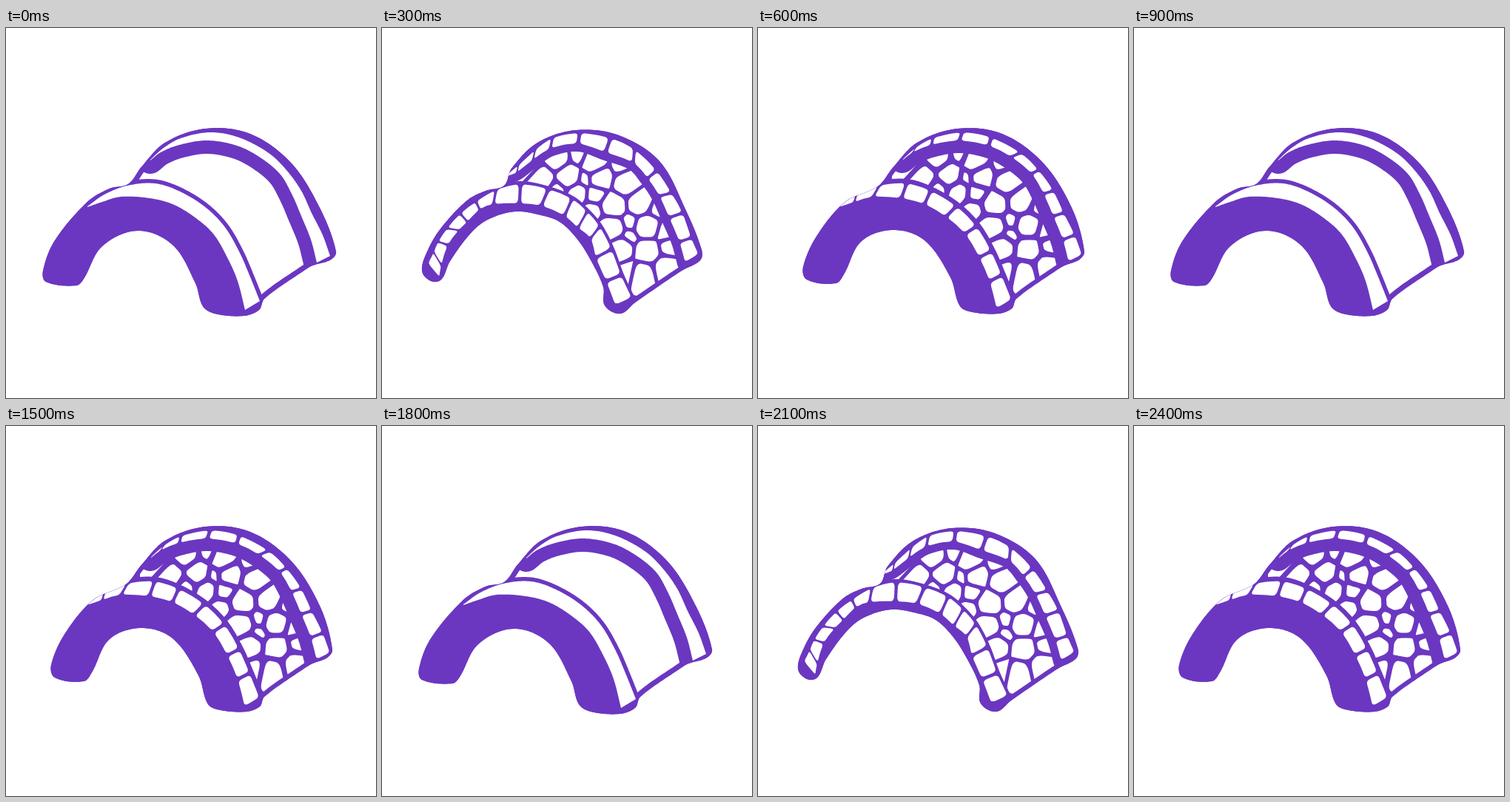
An HTML page with a canvas that plays this animation: 500 px wide and 500 px high, repeating every 2700 ms.

```html
<!DOCTYPE html>
<html lang="en">
<head>
<meta charset="utf-8">
<title>Stone arch</title>
<style>
html, body { margin: 0; width: 100%; height: 100%; overflow: hidden; background: #fff; }
canvas { display: block; }
</style>
</head>
<body>
<canvas id="stage" width="500" height="500"></canvas>
<script>
const ctx = document.getElementById('stage').getContext('2d');
const PURPLE = '#6b37c1', STEP = 300, FINE = 16;

const points = text => text.trim().split(/\s+/).map(p => p.split(',').map(Number));
const mix = (a, b, k) => [a[0] + (b[0] - a[0]) * k, a[1] + (b[1] - a[1]) * k];
const dist = (a, b) => Math.hypot(b[0] - a[0], b[1] - a[1]);

// Smooth line through the points, with FINE samples per span.
function spline(pts, closed) {
  const n = pts.length, spans = closed ? n : n - 1, out = [];
  const at = i => closed ? pts[(i + n) % n] : pts[Math.max(0, Math.min(n - 1, i))];
  const handle = (i, len) => {
    const a = at(i - 1), b = at(i + 1), d = dist(a, b) || 1;
    return [(b[0] - a[0]) / d * len, (b[1] - a[1]) / d * len];
  };
  for (let i = 0; i < spans; i++) {
    const a = at(i), b = at(i + 1), len = dist(a, b) / 3;
    const h = handle(i, len), g = handle(i + 1, len);
    for (let j = 0; j < FINE; j++) {
      const t = j / FINE, s = 1 - t;
      out.push([0, 1].map(c => s * s * s * a[c] + 3 * s * s * t * (a[c] + h[c]) +
        3 * s * t * t * (b[c] - g[c]) + t * t * t * b[c]));
    }
  }
  if (!closed) out.push(pts[n - 1]);
  return out;
}

function line(pts, close) {
  const path = new Path2D();
  pts.forEach(p => path.lineTo(...p));
  if (close) path.closePath();
  return path;
}

function rounded(pts, k = .3) {
  const path = new Path2D(), n = pts.length;
  pts.forEach((p, i) => {
    path.lineTo(...mix(p, pts[(i + n - 1) % n], k));
    path.quadraticCurveTo(...p, ...mix(p, pts[(i + 1) % n], k));
  });
  path.closePath();
  return path;
}

// A rim runs between two lines; facing points mark the joints between its stones.
function rim(outer, inner) {
  const o = spline(points(outer)), i = spline(points(inner));
  const stones = [], picks = [1, FINE / 2, FINE - 1];
  for (let s = 0; s + FINE < o.length; s += FINE) {
    const top = picks.map(p => o[s + p]), low = picks.map(p => i[s + p]);
    stones.push(rounded([...top, ...low.reverse()]));
  }
  return { outer: o, inner: i, stones, whole: line([...o, ...[...i].reverse()], true) };
}

// Stones of the inner wall, grouped by radius.
const sites = Object.entries({
  15: '236,178 251,199 287,183 216,201 296,202 329,210 313,239 348,237 310,271 358,268 323,299 358,302 352,332 384,325',
  9: '264,222 290,224 388,296 383,275 204,190 333,328',
  5: '265,174 275,203 321,189 286,247 336,262 369,246 334,283 237,216'
}).flatMap(([r, text]) => points(text).map(p => ({ p, r: +r })));

// Cell of one stone: each neighbour cuts it off, leaving half the mortar.
function cell(a, mortar) {
  let poly = [[-1, -1], [1, -1], [1, 1], [-1, 1]].map(([x, y]) => [a.p[0] + x * 30, a.p[1] + y * 30]);
  for (const b of sites) {
    if (b === a) continue;
    const d = dist(a.p, b.p);
    const limit = (d * d + a.r * a.r - b.r * b.r) / (2 * d) - mortar / 2;
    const over = q => ((q[0] - a.p[0]) * (b.p[0] - a.p[0]) + (q[1] - a.p[1]) * (b.p[1] - a.p[1])) / d - limit;
    poly = poly.flatMap((q, i) => {
      const next = poly[(i + 1) % poly.length], u = over(q), v = over(next);
      const kept = u <= 0 ? [q] : [];
      if (u * v < 0) kept.push(mix(q, next, u / (u - v)));
      return kept;
    });
  }
  return rounded(poly);
}

function makePose({ body, front, far, shift, mortar, farLine, frontLine, edge }) {
  const wall = [...front.outer.filter(p => p[0] > 150), ...[...far.inner].reverse()];
  return {
    body: line(spline(points(body), true), true),
    wall: line(wall, true),
    cells: mortar && sites.map(s => cell(s, mortar)),
    lines: [[line(far.inner), farLine], [line(front.outer), frontLine]],
    front, far, shift, edge
  };
}

const back = tip => `349,366 404,327 414,321 ${tip - 7},313 ${tip},302 424,243 385,182 330,143 270,136 215,155 182,189`;

const front = rim(
  '110,241 133,225 164,213 201,210 233,220 268,241 295,268 315,302 329,334 343,369',
  '110,242 130,235 155,228 194,230 225,238 254,255 280,278 299,310 313,342 323,381');
const far = rim(
  '195,178 213,162 236,149 276,141 315,148 355,169 379,192 399,220 413,250 428,280 438,308',
  '195,179 209,168 234,158 272,152 312,159 342,174 370,197 386,224 399,254 412,286 420,317');

const plain = makePose({
  body: '165,211 140,217 110,235 66,287 50,328 54,343 95,348 105,339 130,295 178,274 225,293 256,345 266,376 282,386 321,389 342,381 ' + back(446),
  front, far, farLine: 36, frontLine: 11, edge: 14
});

const cobbled = makePose({
  body: '162,214 118,235 80,280 61,323 66,340 105,345 116,333 140,288 183,273 225,287 260,337 273,376 290,384 325,386 343,379 ' + back(441),
  front, far, shift: [7, -2], mortar: 7, farLine: 34, frontLine: 12, edge: 12
});

const shaded = makePose({
  body: `165,213 140,220 115,233 80,270 62,300 54,328 66,342 80,340 92,315 122,275 145,258 180,248 215,253 240,262
    262,283 280,310 299,350 301,375 322,386 342,371 405,328 430,314 432,300 410,245 375,180 320,145 262,138 210,155 175,190`,
  front: rim(
    '62,319 70,303 76,289 88,271 106,251 127,235 154,219 187,211 225,218 257,231 277,248 294,268 310,299 323,334 338,366',
    '77,337 80,321 89,293 104,273 115,262 132,245 150,238 186,237 215,240 247,254 265,270 282,284 289,310 303,342 316,376'),
  far: rim(
    '168,199 184,186 207,165 230,149 267,142 309,149 341,164 371,193 391,223 406,250 418,284 428,307',
    '170,200 182,195 204,178 227,163 265,156 302,168 340,182 359,203 375,227 388,256 402,289 410,318'),
  shift: [0, 0], mortar: 5, farLine: 22, frontLine: 8, edge: 12
});

const poses = [plain, shaded, cobbled];

function drawWall(pose) {
  ctx.save();
  ctx.clip(pose.wall);
  ctx.fillStyle = '#fff';
  if (pose.cells) {
    ctx.translate(...pose.shift);
    pose.cells.forEach(c => ctx.fill(c));
  } else {
    ctx.fill(pose.wall);
  }
  ctx.restore();
}

function draw(pose) {
  ctx.fillStyle = '#fff';
  ctx.fillRect(0, 0, 500, 500);
  ctx.fillStyle = ctx.strokeStyle = PURPLE;
  ctx.lineCap = ctx.lineJoin = 'round';
  ctx.fill(pose.body);
  ctx.save();
  ctx.clip(pose.body);
  drawWall(pose);
  for (const [path, width] of [...pose.lines, [pose.body, pose.edge]]) {
    ctx.lineWidth = width;
    ctx.stroke(path);
  }
  ctx.fillStyle = '#fff';
  for (const r of [pose.far, pose.front]) {
    (pose.cells ? r.stones : [r.whole]).forEach(s => ctx.fill(s));
  }
  ctx.restore();
}

const start = performance.now();
function tick() {
  draw(poses[Math.floor((performance.now() - start) / STEP) % poses.length]);
  requestAnimationFrame(tick);
}
tick();
</script>
</body>
</html>
```
